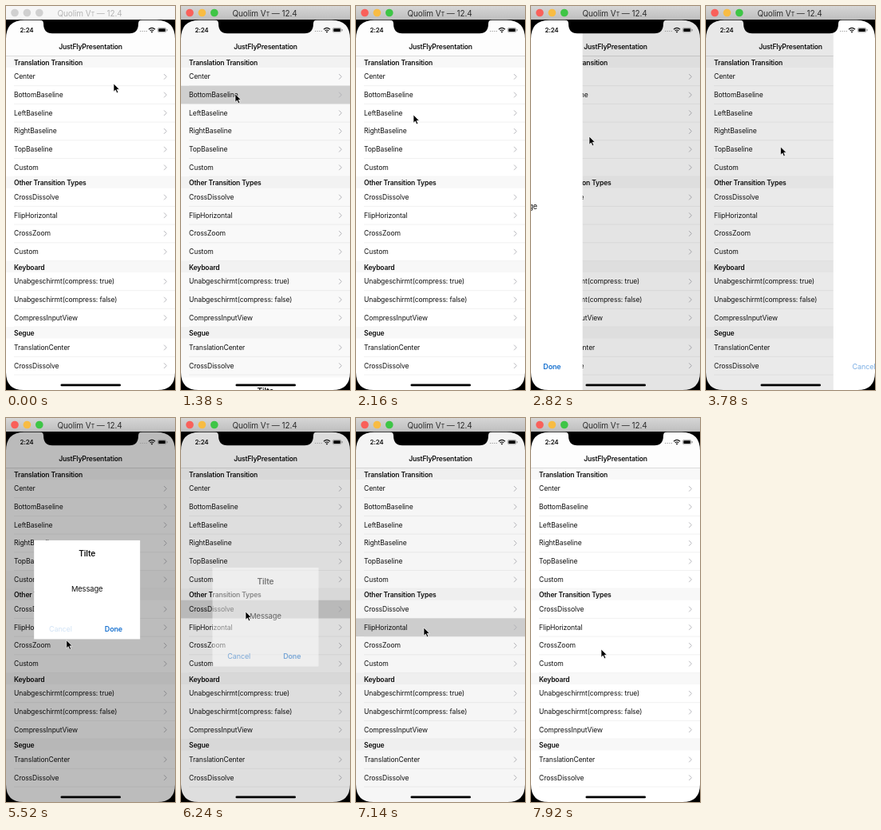
An HTML page that plays this animation: 212 px wide and 480 px high, repeating every 8 s.

```html
<!DOCTYPE html>
<html lang="en">
<head>
<meta charset="utf-8">
<title>Presentation demo</title>
<style>
  html, body { margin: 0; width: 100%; height: 100%; overflow: hidden; background: #fff; }
  svg { display: block; width: 100vw; height: 100vh; }
  text { font: 8.6px Inter, "Liberation Sans", sans-serif; letter-spacing: -.11px; fill: #111; }
  .b { font-weight: 600; letter-spacing: -.18px; }
  .mid { text-anchor: middle; }
  #sheet text { font-size: 9.4px; }
  #sheet .title { font-size: 10.2px; }
  #sheet .btn { font-size: 9px; fill: #1a73d0; }
  #bar text { font-size: 10px; }
  #bar tspan { font-size: 7.5px; }
  #time { font-size: 8px; }
</style>
</head>
<body>
<svg viewBox="0 0 212 480">
  <defs>
    <linearGradient id="metal" x2="0" y2="1">
      <stop stop-color="#d6d6d6"/><stop offset="1" stop-color="#bebebe"/>
    </linearGradient>
  </defs>
  <rect width="212" height="480" fill="#fff"/>
  <g id="list"></g>
  <rect y="17" width="212" height="45.5" fill="#fdfdfd"/>
  <path d="M0 62.5H212" stroke="#c8c8c8" stroke-width=".6"/>
  <text class="b mid" x="106" y="54">JustFlyPresentation</text>
  <rect id="dim" y="17" width="212" height="463"/>
  <g id="sheet">
    <rect fill="#fff"/>
    <text class="b mid title">Tilte</text>
    <text class="mid">Message</text>
    <text class="mid btn">Cancel</text>
    <text class="b mid btn">Done</text>
  </g>
  <text class="b" id="time" x="17.5" y="33">2:24</text>
  <path d="M168 31.5H177" stroke="#999" stroke-width="1.2" stroke-dasharray="1.2 1.4"/>
  <path d="M179 29.2Q183 25.6 187 29.2M180.7 31Q183 29 185.3 31" fill="none" stroke="#111" stroke-width="1.2"/>
  <circle cx="183" cy="32.4" r=".9"/>
  <rect x="190.4" y="27.4" width="10.4" height="5.4" rx="1.4" fill="none" stroke="#777" stroke-width=".6"/>
  <rect x="191.3" y="28.3" width="8.6" height="3.6" rx=".7"/>
  <path d="M202 29V31.3" stroke="#777"/>
  <rect x="68.5" y="472.6" width="75.5" height="2.6" rx="1.3"/>
  <path fill-rule="evenodd" d="M0 17H212V480H0ZM23 17.7Q0 17.7 0 41V458Q0 480 22 480H190Q212 480 212 458V41Q212 17.7 189 17.7Z"/>
  <path d="M42 17Q47 17.5 47 22Q47 34.3 58 34.3H155Q166 34.3 166 22Q166 17.5 171 17Z"/>
  <g id="bar">
    <rect width="212" height="17"/>
    <circle cx="11" cy="8.5" r="4.8"/><circle cx="26.4" cy="8.5" r="4.8"/><circle cx="41.8" cy="8.5" r="4.8"/>
    <text class="mid" x="105" y="12.5">Quolim V<tspan>T</tspan> — 12.4</text>
  </g>
  <path id="cursor" d="M0 0V10.2L2.4 8L4 11.8L5.8 11L4.2 7.3H7.4Z" stroke="#fff" stroke-width=".7"/>
</svg>
<script>
const $ = id => document.getElementById(id);
const LOOP = 8000, STEP = 60, MOVE = 240, REST = 150, GLIDE = 120;
const W = 212, H = 480, TOP = 17, ROW = 22.7, HEAD = 14.5, NOTCH = 22, HOME = 17;

const clamp = v => Math.max(0, Math.min(1, v));
const ease = v => (v = clamp(v), v * v * (3 - 2 * v));
const set = (el, attrs) => { for (const k in attrs) el.setAttribute(k, attrs[k]); };

const sections = [
  ['Translation Transition', 'Center', 'BottomBaseline', 'LeftBaseline', 'RightBaseline', 'TopBaseline', 'Custom'],
  ['Other Transition Types', 'CrossDissolve', 'FlipHorizontal', 'CrossZoom', 'Custom'],
  ['Keyboard', 'Unabgeschirmt(compress: true)', 'Unabgeschirmt(compress: false)', 'CompressInputView'],
  ['Segue', 'TranslationCenter', 'CrossDissolve'],
];

let y = 62.5, html = '';
for (const [head, ...rows] of sections) {
  html += `<rect y="${y}" width="${W}" height="${HEAD}" fill="#f8f8f8"/><text class="b" x="10" y="${y + 11}">${head}</text>`;
  y += HEAD;
  for (const row of rows) {
    const c = y + ROW / 2;
    html += `<rect class="cell" y="${y}" width="${W}" height="${ROW}" fill="#d4d4d4" opacity="0"/>
      <text x="10" y="${c + 3}">${row}</text>
      <path d="M198.2 ${c - 3.3}l3.2 3.3l-3.2 3.3" fill="none" stroke="#b8b8bd"/>
      <path d="M10 ${y + ROW}H${W}" stroke="#e2e2e2" stroke-width=".5"/>`;
    y += ROW;
  }
}
$('list').innerHTML = html;
const cells = [...document.querySelectorAll('.cell')];

// dx, dy: where a sheet hides; top, bottom: safe insets
const card = { x: 39.5, y: 187, w: 133, h: 123.5, dx: 0, dy: 0, top: 0, bottom: 0 };
const wide = { ...card, x: 0, w: W };
const tall = { ...card, x: 0, y: TOP, w: 153, h: H - TOP, top: NOTCH, bottom: HOME };
const low = card.h + HOME, high = card.h + NOTCH;
const sheets = [
  { ...card, dy: H - card.y },
  { ...wide, y: H - low, h: low, dy: low, bottom: HOME },
  { ...tall, dx: -tall.w },
  { ...tall, x: W - tall.w, dx: tall.w },
  { ...wide, y: TOP, h: high, dy: -high, top: NOTCH },
  { ...card, dx: -card.x, dy: -card.y - card.h },
  { ...card, fade: true },
  { ...card, flip: true },
];

// Where the pointer taps each row
const entry = [135, 97];
const taps = [[74, 90], [68, 110], [72, 136], [73, 163], [93.5, 176], [85, 205], [81, 242], [85, 262], [88, 289]];

// A sheet stays longer the farther its Cancel button is from the tap
const moves = [{ at: 0, dur: GLIDE, goal: taps[0] }];
sheets.forEach((s, i) => {
  const cancel = [s.x + s.w / 4, s.y + s.h - s.bottom - 12];
  s.from = 372 + 958 * i;
  s.to = s.from + 270 + .409 * Math.hypot(cancel[0] - taps[i][0], cancel[1] - taps[i][1]);
  moves.push({ at: s.from + REST, dur: s.to - s.from - REST, goal: cancel },
             { at: s.to, dur: GLIDE, goal: taps[i + 1] });
});

const pointer = t => moves.reduce((pos, m) => {
  const k = ease((t - m.at) / m.dur);
  return pos.map((v, n) => v + (m.goal[n] - v) * k);
}, entry);

function drawSheet(s, p, t) {
  const [panel, title, message, cancel, done] = $('sheet').children;
  const mid = s.x + s.w / 2, base = s.y + s.h - s.bottom - 9.5;
  set(panel, { x: s.x, y: s.y, width: s.w, height: s.h });
  set(title, { x: mid, y: s.y + s.top + 20.5 });
  set(message, { x: mid, y: s.y + (s.top + s.h - s.bottom) / 2 + 2.5 });
  set(cancel, { x: s.x + s.w / 4, y: base, opacity: t < s.to - 40 ? 1 : .2 + .8 * clamp((t - s.to - 60) / 180) });
  set(done, { x: s.x + s.w * .75, y: base });
  const turn = s.flip ? Math.max(0, -Math.cos(Math.PI * p)) : 1;
  set($('sheet'), {
    transform: `translate(${s.dx * (1 - p) + mid * (1 - turn)} ${s.dy * (1 - p)}) scale(${turn} 1)`,
    opacity: s.fade ? p : 1,
  });
}

function drawBar(active) {
  const [bg, ...dots] = $('bar').children;
  const label = dots.pop();
  bg.setAttribute('fill', active ? 'url(#metal)' : '#f6f6f6');
  label.style.fill = active ? '#2c2c2c' : '#b4b4b4';
  dots.forEach((dot, i) => dot.setAttribute('fill', active ? ['#f9605a', '#f8bc43', '#3ec546'][i] : '#d0d0d0'));
}

function draw(t) {
  const s = sheets.find(s => t >= s.from && t < s.to + MOVE);
  const p = s ? ease((t - s.from) / MOVE) * (1 - ease((t - s.to) / MOVE)) : 0;
  $('dim').setAttribute('opacity', .3 * p ** 1.2);
  $('sheet').style.display = s ? '' : 'none';
  if (s) drawSheet(s, p, t);
  sheets.forEach(({ from }, i) =>
    cells[i].setAttribute('opacity', t < from ? 0 : 1 - clamp((t - from - 180) / 200)));
  drawBar(t >= 300);
  $('cursor').setAttribute('transform', `translate(${pointer(t)})`);
}

const start = performance.now();
function tick() {
  const t = Math.max(0, performance.now() - start) % LOOP;
  draw(Math.floor(t / STEP) * STEP);
  requestAnimationFrame(tick);
}
tick();
</script>
</body>
</html>
```
